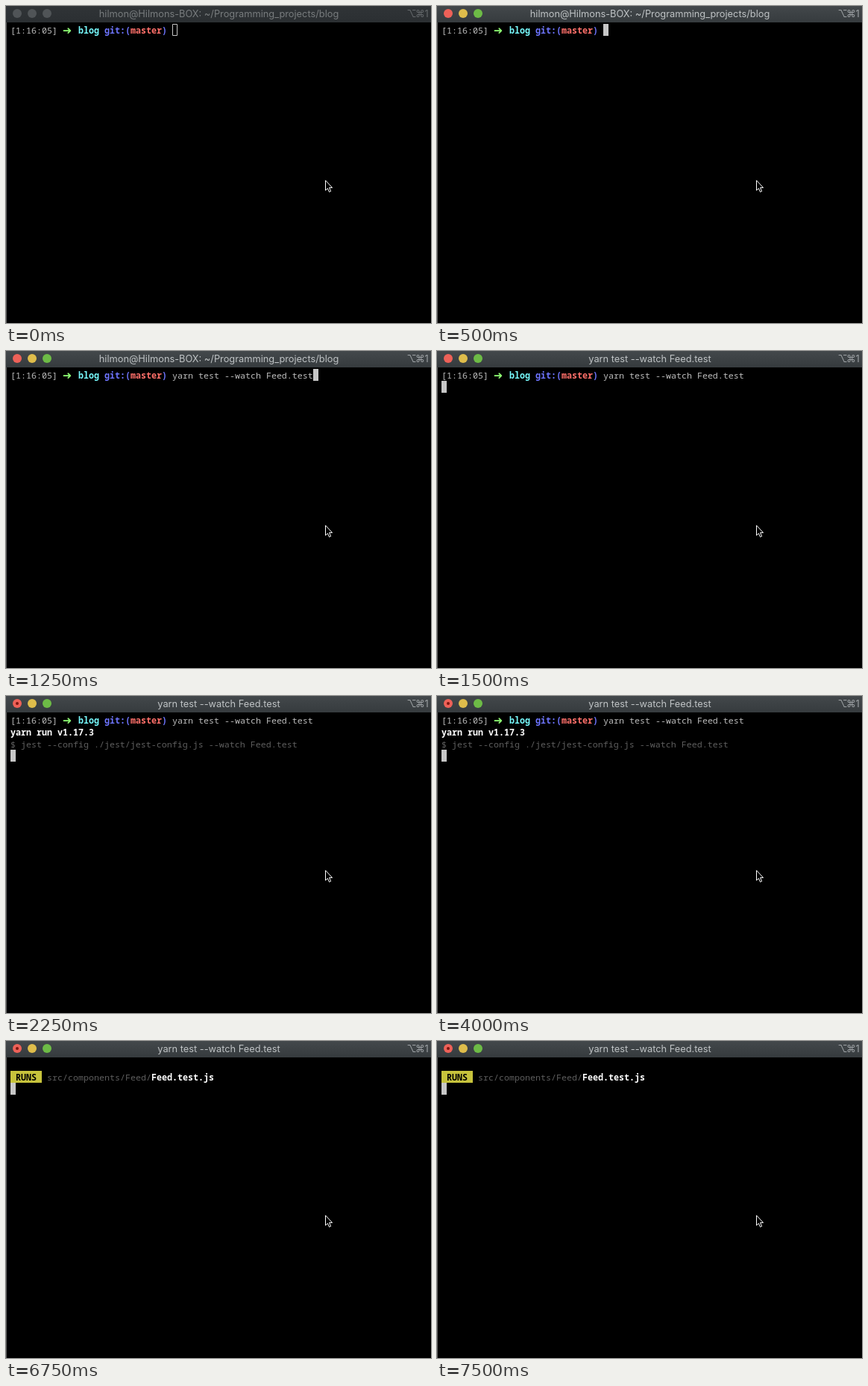
Write an HTML page with a canvas that moves like this. It is 570 px wide and 425 px high and loops after 8000 ms.

```html
<!DOCTYPE html>
<html lang="en">
<head>
<meta charset="utf-8">
<title>Terminal test run</title>
<style>
  html, body { margin: 0; width: 100%; height: 100%; overflow: hidden; background: #000; }
  canvas { display: block; }
</style>
</head>
<body>
<canvas id="stage" width="570" height="425"></canvas>
<script>
const ctx = document.getElementById('stage').getContext('2d', { alpha: false });
const LOOP = 8000, W = 570, H = 425, BAR = 22;
const LEFT = 6, TOP = 24, COL = 7, ROW = 16;

const MONO = '11.667px "Noto Sans Mono", "DejaVu Sans Mono", monospace';
const UI = '12.8px Inter, "DejaVu Sans", sans-serif';
const FG = '#bdbdbd', DIM = '#5e5e5e', WHITE = '#ffffff', CURSOR = '#c7c7c7';

const COMMAND = 'yarn test --watch Feed.test';
const HOME_TITLE = 'hilmon@Hilmons-BOX: ~/Programming_projects/blog';

// Start times of each step
const FOCUS = 500, TYPE = 1000, TYPED = 1250, ENTER = 1500,
      OUTPUT = 2000, MARK = 2250, RUNS = 5750;

function text(str, x, y, color, font, align = 'left') {
  ctx.font = font;
  ctx.fillStyle = color;
  ctx.textAlign = align;
  ctx.fillText(str, x, y);
}

function cell(str, col, row, color, bold = false) {
  text(str, LEFT + col * COL, TOP + row * ROW + 13, color, (bold ? '600 ' : '') + MONO);
}

function cursor(col, row, hollow = false) {
  const x = LEFT + col * COL, y = TOP + row * ROW;
  if (hollow) {
    ctx.strokeStyle = CURSOR;
    ctx.lineWidth = 1;
    ctx.strokeRect(x + 0.5, y + 0.5, COL - 1, ROW - 1);
  } else {
    ctx.fillStyle = CURSOR;
    ctx.fillRect(x, y, COL, ROW);
  }
}

function disc(x, y, r, color) {
  ctx.fillStyle = color;
  ctx.beginPath();
  ctx.arc(x, y, r, 0, Math.PI * 2);
  ctx.fill();
}

function titleBar(t) {
  const active = t >= FOCUS;
  const bar = ctx.createLinearGradient(0, 0, 0, BAR);
  bar.addColorStop(0, active ? '#43484b' : '#303437');
  bar.addColorStop(1, active ? '#363b3e' : '#2b2f32');
  ctx.fillStyle = bar;
  ctx.fillRect(0, 0, W, BAR);

  const lights = active ? ['#ee6158', '#dfbd4b', '#6dbb46'] : Array(3).fill('#505457');
  lights.forEach((color, i) => disc(15 + i * 20, 10, 6, color));
  if (t >= MARK) disc(15, 10, 2, '#7d1510');

  text(t < ENTER ? HOME_TITLE : COMMAND, 285.5, 15, active ? '#bfc3c5' : '#787c7e', UI, 'center');

  const hint = active ? '#9da1a4' : '#64686b';
  text('⌥', 544, 15, hint, UI, 'center');
  text('⌘', 555.5, 15, hint, UI, 'center');
  text('1', 564, 15, hint, UI, 'center');
}

function prompt(typed) {
  cell('[1:16:05]', 0, 0, FG);
  text('➜', 82, 38, '#8dfb72', 'bold 15px "DejaVu Sans", sans-serif', 'center');
  cell('blog', 13, 0, '#76f8fb', true);
  cell('git:(', 18, 0, '#6e75ff', true);
  cell('master', 23, 0, '#ff706a', true);
  cell(')', 29, 0, '#6e75ff', true);
  cell(typed, 31, 0, FG);
}

function shell(t) {
  const count = t < TYPE ? 0 : t < TYPED ? 5 : COMMAND.length;
  prompt(COMMAND.slice(0, count));
  if (t < ENTER) {
    cursor(31 + count, 0, t < FOCUS);
  } else if (t < OUTPUT) {
    cursor(0, 1);
  } else {
    cell('yarn run v1.17.3', 0, 1, WHITE, true);
    cell('$ jest --config ./jest/jest-config.js --watch Feed.test', 0, 2, DIM);
    cursor(0, 3);
  }
}

function testRun() {
  ctx.fillStyle = '#c7c33c';
  ctx.fillRect(LEFT, TOP + ROW, 6 * COL, ROW);
  cell('RUNS', 1, 1, '#000000', true);
  cell('src/components/Feed/', 7, 1, DIM);
  cell('Feed.test.js', 27, 1, WHITE, true);
  cursor(0, 2);
}

function pointer() {
  const path = new Path2D('M428.5 233.8V247.2L431.4 244.5L433.5 249.3L435.6 248.4L433.6 243.6H437.6Z');
  ctx.fillStyle = '#000';
  ctx.fill(path);
  ctx.strokeStyle = '#fff';
  ctx.lineWidth = 1;
  ctx.lineJoin = 'round';
  ctx.stroke(path);
}

function draw(t) {
  ctx.fillStyle = '#000';
  ctx.fillRect(0, 0, W, H);
  ctx.fillStyle = '#5c5c5c';
  ctx.fillRect(0, BAR, 1, H - BAR);
  titleBar(t);
  if (t < RUNS) shell(t);
  else testRun();
  pointer();
}

const start = performance.now();
function tick() {
  draw((performance.now() - start) % LOOP);
  requestAnimationFrame(tick);
}
tick();
</script>
</body>
</html>
```
